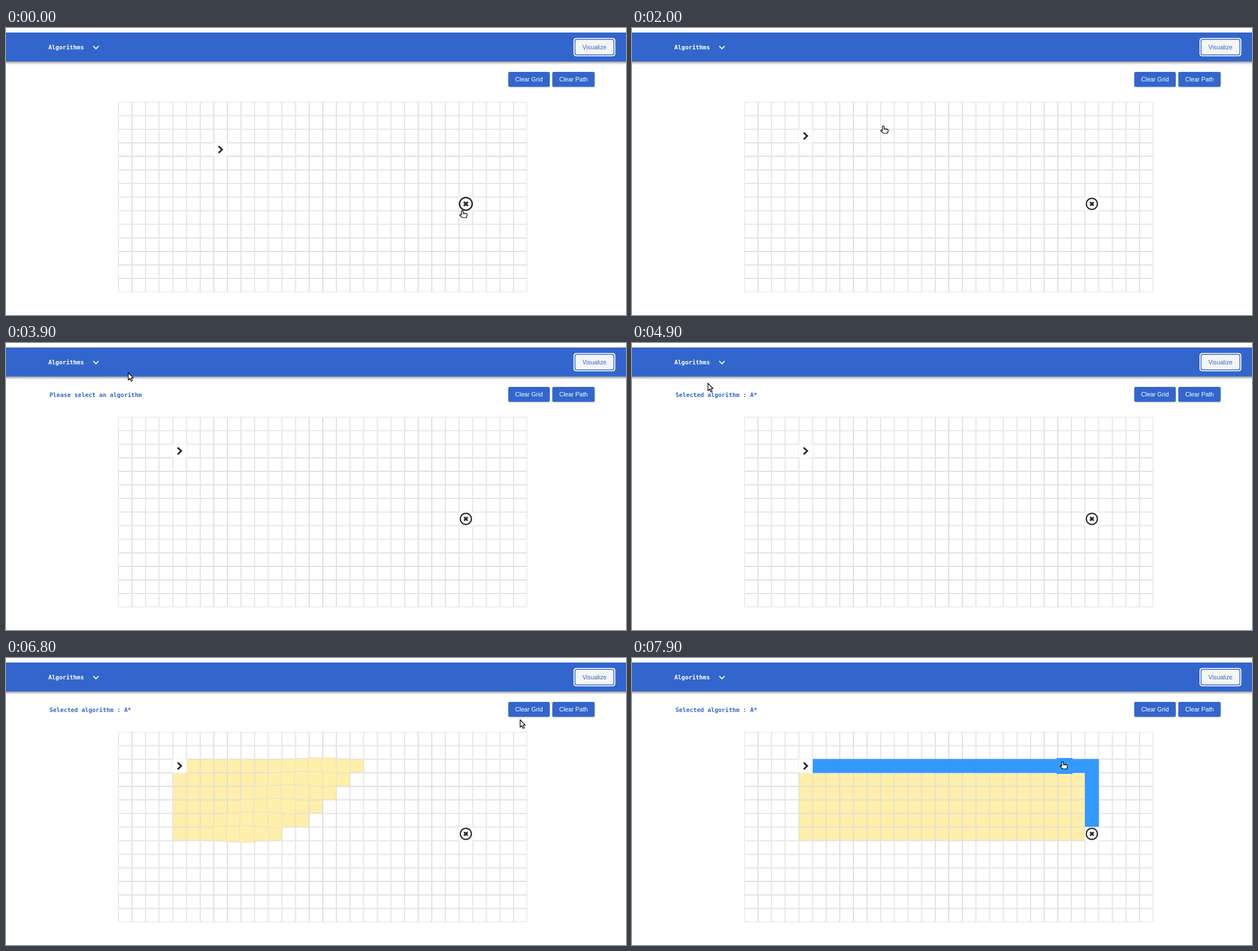
An HTML page with a canvas that plays this animation: 1098x510 px, repeating every 8000 ms.

```html
<!DOCTYPE html>
<html lang="en">
<head>
<meta charset="utf-8">
<title>Pathfinding grid</title>
<style>
html, body { margin: 0; width: 100%; height: 100%; overflow: hidden; background: #fff; }
canvas { display: block; width: 1098px; height: 510px; }
</style>
</head>
<body>
<canvas id="stage" width="1098" height="510"></canvas>
<script>
const ctx = document.getElementById('stage').getContext('2d');
const LOOP = 8000, STEP = 100;
const COLS = 30, ROWS = 14, PITCH = 724 / 30, LEFT = 199, TOP = 131.5;
const BLUE = '#3366cc', LINE = '#dcdcdc', YELLOW = '#ffefaa', PATH = '#3399ff', INK = '#2a2a2a';
const SANS = '10.72px "Liberation Sans", Arial, sans-serif';
const MONO = 'bold 10.46px "DejaVu Sans Mono", monospace';
const HOVER = 0.15;
const OLD_START = [7, 3], START = [4, 2], GOAL = [25, 7];
const SEARCH = 6465, TRACE = 7340, DROP = 1300;

// Pointer moves: begin, end, x and y of the tip
const moves = [
  [400, 400, 317, 208], [600, 600, 378, 213], [700, 1000, 304, 189],
  [1200, 1700, 295, 186], [1800, 2000, 445, 174], [2000, 2600, 1042, 32],
  [3100, 3900, 216, 52], [3900, 4300, 145, 33], [4400, 4800, 134, 71],
  [4900, 5700, 1047, 1], [5700, 6200, 1057.5, 34.5], [6500, 7100, 762.5, 184]
];

const ramp = (t, a, b) => t >= b ? 1 : t <= a ? 0 : (t - a) / (b - a);
const ease = (t, a, b) => { const v = ramp(t, a, b); return v * v * (3 - 2 * v); };
const pulse = (age, peak) => peak * (ease(age, 28, 90) - ease(age, 95, 195));
const mix = (a, b, k) => a + (b - a) * k;
const same = (a, b) => a[0] === b[0] && a[1] === b[1];

// Diagonal sweep from start towards goal
const visited = [];
for (let d = 1; d < 26; d++)
  for (let r = START[1]; r <= GOAL[1]; r++) {
    const c = START[0] + d - (r - START[1]);
    if (c >= START[0] && c <= GOAL[0]) visited.push([c, r]);
  }

const route = [];
for (let c = START[0] + 1; c <= GOAL[0]; c++) route.push([c, START[1]]);
for (let r = START[1] + 1; r < GOAL[1]; r++) route.push([GOAL[0], r]);

function pointerAt(t) {
  let x = 808, y = 324;
  for (const [begin, end, toX, toY] of moves) {
    if (t < begin) break;
    const k = ease(t, begin, end);
    x = mix(x, toX, k);
    y = mix(y, toY, k);
  }
  return [x, y];
}

function box(x, y, w, h, r, fill) {
  ctx.fillStyle = fill;
  ctx.beginPath();
  ctx.roundRect(x, y, w, h, r);
  ctx.fill();
}

function line(points, color, width) {
  ctx.strokeStyle = color;
  ctx.lineWidth = width;
  ctx.beginPath();
  points.forEach(([x, y], i) => i ? ctx.lineTo(x, y) : ctx.moveTo(x, y));
  ctx.stroke();
}

function text(s, x, y, font, color, align = 'left') {
  ctx.font = font;
  ctx.fillStyle = color;
  ctx.textAlign = align;
  ctx.fillText(s, x, y);
}

function withShadow(dy, blur, alpha, draw) {
  ctx.save();
  ctx.shadowColor = `rgba(0,0,0,${alpha})`;
  ctx.shadowOffsetY = dy;
  ctx.shadowBlur = blur;
  draw();
  ctx.restore();
}

function cell([c, r], fill, border, grow = 0) {
  const pad = PITCH * grow / 2 + (border ? 0 : 0.3);
  const x = LEFT + c * PITCH - pad, y = TOP + r * PITCH - pad, size = PITCH + 2 * pad;
  ctx.fillStyle = fill;
  ctx.fillRect(x, y, size, size);
  if (!border) return;
  ctx.strokeStyle = border;
  ctx.lineWidth = 0.9;
  ctx.strokeRect(x + 0.45, y + 0.45, size - 0.9, size - 0.9);
}

function icon([c, r], grow, draw) {
  ctx.save();
  ctx.translate(LEFT + (c + 0.5) * PITCH, TOP + (r + 0.5) * PITCH);
  ctx.scale(1 + grow, 1 + grow);
  draw();
  ctx.restore();
}

function chevron() {
  line([[-3.6, -6], [2.7, 0], [-3.6, 6]], INK, 3);
}

function crossMark() {
  ctx.strokeStyle = INK;
  ctx.lineWidth = 2.2;
  ctx.beginPath();
  ctx.arc(0, 0, 9.8, 0, 7);
  ctx.stroke();
  for (const s of [-3.1, 3.1]) line([[-3.1, -s], [3.1, s]], INK, 2.9);
}

function marker(place, grow, draw) {
  cell(place, '#fff', grow > 0.01 ? LINE : null, grow);
  icon(place, grow, draw);
}

function drawHeader(t) {
  withShadow(2, 4, 0.4, () => box(-10, 8, 1118, 51.6, 0, BLUE));
  ctx.fillStyle = '#fff';
  ctx.fillRect(0, 0, 1098, 8);
  text('Algorithms', 75, 38, MONO, '#fff');
  line([[154.6, 32.2], [159.3, 37], [164, 32.2]], '#fff', 1.8);

  const hover = (from, to) => ramp(t, from, from + 300) - ramp(t, to, to + 300);
  const w = 67.4 + 11.6 * (hover(2300, 3100) + hover(5900, 6500));
  const x = 1075.8 - w;
  box(x - 3.3, 17.7, w + 6.6, 32.6, 4.5, '#fff');
  box(x - 1.5, 19.5, w + 3, 29, 3.5, BLUE);
  box(x, 21, w, 26, 2.5, '#f5f5f5');
  text('Visualize', x + w / 2, 38, SANS, BLUE, 'center');
}

function drawControls(t) {
  withShadow(1, 2, 0.2, () => {
    box(889.5, 78, 73.5, 26.6, 2.5, BLUE);
    box(967.5, 78, 75, 26.6, 2.5, BLUE);
  });
  text('Clear Grid', 926.2, 95, SANS, '#fff', 'center');
  text('Clear Path', 1005, 95, SANS, '#fff', 'center');
  if (t >= 3100)
    text(t < 4900 ? 'Please select an algorithm' : 'Selected algorithm : A*', 77, 96, MONO, BLUE);
  if (t >= 4300 && t < 4900) {
    withShadow(1, 2, 0.3, () => box(70, 60, 237, 44, 2, '#fff'));
    text('A*', 80, 78, MONO, BLUE);
    text('Dijkstra', 80, 96, MONO, BLUE);
  }
}

function drawGrid(t) {
  for (let r = 0; r < ROWS; r++)
    for (let c = 0; c < COLS; c++) cell([c, r], '#fff', LINE);

  const [px, py] = pointerAt(t);
  const under = [Math.floor((px - LEFT) / PITCH), Math.floor((py - TOP) / PITCH)];
  const raised = [];
  const mark = (place, fill, border, grow) => {
    if (same(place, under)) grow = Math.max(grow, HOVER);
    if (grow > 0.005) raised.push([place, fill, border, grow]);
    else cell(place, fill, border);
  };

  visited.forEach((place, i) => {
    const age = t - SEARCH - (i + 1) * 5;
    if (age >= 0) mark(place, YELLOW, LINE, pulse(age, 0.25));
  });
  route.forEach((place, i) => {
    const age = t - TRACE - i * 15;
    if (age >= 0) mark(place, PATH, null, pulse(age, 0.35));
  });
  raised.forEach(args => cell(...args));

  if (t < DROP) marker(OLD_START, t >= 600 ? HOVER : 0, chevron);
  else marker(START, HOVER * (t < 1900 ? ramp(t, 1200, 1500) : 0), chevron);
  const reached = pulse(t - TRACE - route.length * 15, 0.2);
  marker(GOAL, t < 400 ? HOVER : reached, crossMark);

  // Faint copy carried along while dragging
  if (t >= 800 && t < DROP) {
    const k = ease(t, 700, 1000);
    ctx.globalAlpha = 0.5;
    icon(OLD_START.map((v, i) => mix(v, START[i], k)), HOVER, chevron);
    ctx.globalAlpha = 1;
  }
}

const HAND = new Path2D('M-1.5 7V1.2Q0 -.9 1.5 1.2V4.8L7.4 5.7Q9 6.2 8.8 8L7.5 13H.2L-4.2 9.2Q-4.8 7.2 -2.9 7.2L-1.5 8.3Z');
const ARROW = new Path2D('M.5 .5V13.8L3.5 11 5.8 16 8 15 5.8 10.2H9.6Z');

function drawPointer(t) {
  const [x, y] = pointerAt(t);
  const inside = (l, r, top, bottom) => x > l && x < r && y > top && y < bottom;
  const overLink = inside(LEFT, 923, TOP, 470) || inside(997, 1077, 20, 49) || inside(74, 166, 24, 44);
  const shape = overLink ? HAND : ARROW;
  ctx.save();
  ctx.translate(x, y);
  ctx.lineJoin = 'round';
  ctx.lineWidth = 1.2;
  ctx.fillStyle = '#fff';
  ctx.strokeStyle = '#000';
  ctx.fill(shape);
  ctx.stroke(shape);
  if (overLink)
    for (let i = 0; i < 3; i++) line([[1.6 + i * 2.4, 5.1 + i * 0.4], [1.6 + i * 2.4, 7.3]], '#000', 0.8);
  ctx.restore();
}

function draw(t) {
  ctx.fillStyle = '#fff';
  ctx.fillRect(0, 0, 1098, 510);
  drawHeader(t);
  drawGrid(t);
  drawControls(t);
  drawPointer(t);
}

const begin = performance.now();
function tick() {
  const t = (performance.now() - begin) % LOOP;
  draw(Math.floor(t / STEP) * STEP);
  requestAnimationFrame(tick);
}
tick();
</script>
</body>
</html>
```
